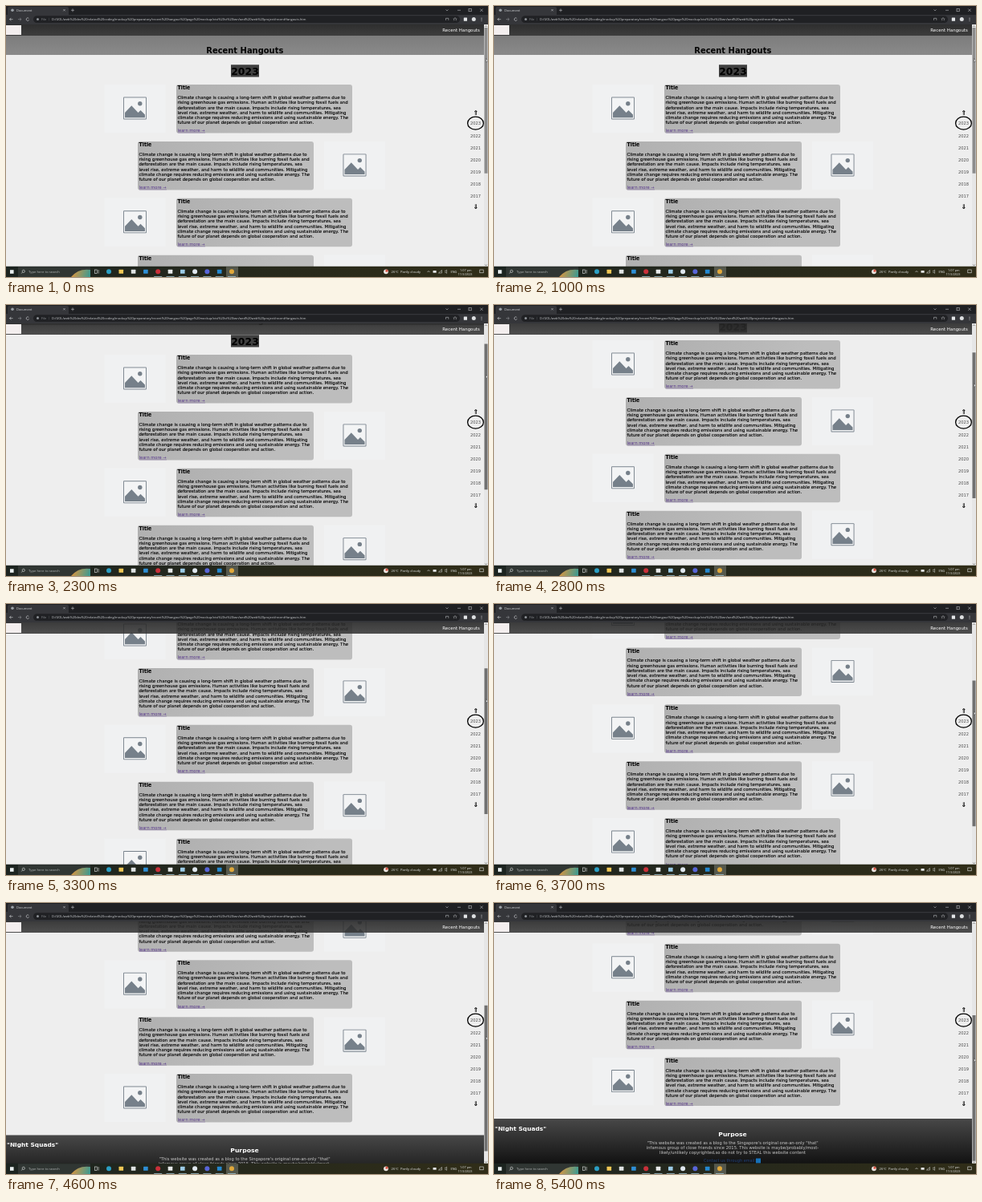
Write an HTML page with a canvas that moves like this. It is 600x338 px and loops after 5.5 s.

```html
<!DOCTYPE html>
<html lang="en">
<head>
<meta charset="utf-8">
<title>Recent Hangouts</title>
<style>
html, body { margin: 0; width: 100%; height: 100%; overflow: hidden; background: #202124; }
canvas { display: block; width: 600px; height: 338px; }
</style>
</head>
<body>
<canvas id="stage"></canvas>
<script>
const W = 600, H = 338, LOOP = 5500, STEP = 100, MAX_SCROLL = 189;
const VERDANA = '"DejaVu Sans", sans-serif';
const SEGOE = '"Open Sans", sans-serif';
const canvas = document.getElementById('stage');
const ctx = canvas.getContext('2d');
const dpr = window.devicePixelRatio || 1;
canvas.width = W * dpr;
canvas.height = H * dpr;

// Scrollbar drag: [time, distance in page pixels]
const DRAG = [[0, 0], [1200, 0], [1800, 18], [2800, 54], [3300, 89], [4100, 140], [5500, 220]];

const BODY = [
  'Climate change is causing a long-term shift in global weather patterns due to',
  'rising greenhouse gas emissions. Human activities like burning fossil fuels and',
  'deforestation are the main cause. Impacts include rising temperatures, sea',
  'level rise, extreme weather, and harm to wildlife and communities. Mitigating',
  'climate change requires reducing emissions and using sustainable energy. The',
  'future of our planet depends on global cooperation and action.'
];
const PURPOSE = [
  '"This website was created as a blog to the Singapore\'s original one-an-only "that"',
  'infamous group of close friends since 2015. This website is maybe/probably/most-',
  'likely/unlikely copyrighted,so do not try to STEAL this website content'
];
const PATH = 'D:/UOL/web%20dev%20related%20coding/mockup%20preparatory/recent%20hangout%20page%20mockup/eist%20st%20iwn/aed%20web%20project/recentHangouts.htm';

function dragAt(t) {
  const i = Math.max(1, DRAG.findIndex(p => p[0] >= t));
  const [t0, a] = DRAG[i - 1], [t1, b] = DRAG[i];
  return a + (b - a) * (t - t0) / (t1 - t0);
}

function rect(x, y, w, h, fill, r = 0) {
  ctx.fillStyle = fill;
  ctx.beginPath();
  ctx.roundRect(x, y, w, h, r);
  ctx.fill();
}

function disc(x, y, r, fill) {
  ctx.fillStyle = fill;
  ctx.beginPath();
  ctx.arc(x, y, r, 0, Math.PI * 2);
  ctx.fill();
}

function line(points, color, width = 0.7) {
  ctx.strokeStyle = color;
  ctx.lineWidth = width;
  ctx.beginPath();
  for (let i = 0; i < points.length; i += 2) ctx.lineTo(points[i], points[i + 1]);
  ctx.stroke();
}

function box(x, y, w, h, color, width = 0.7) {
  ctx.strokeStyle = color;
  ctx.lineWidth = width;
  ctx.strokeRect(x, y, w, h);
}

function gradient(x0, y0, x1, y1, from, to) {
  const g = ctx.createLinearGradient(x0, y0, x1, y1);
  g.addColorStop(0, from);
  g.addColorStop(1, to);
  return g;
}

const fade = (y0, y1, from, to) => gradient(0, y0, 0, y1, from, to);

// Lays text out at ten times its size, so tiny fonts keep exact advances.
function text(str, x, y, size, color, { bold = false, align = 'left', font = VERDANA, outline = 0 } = {}) {
  ctx.save();
  ctx.translate(x, y);
  ctx.scale(0.1, 0.1);
  ctx.font = `${bold ? 'bold ' : ''}${size * 10}px ${font}`;
  ctx.textAlign = align;
  ctx.fillStyle = ctx.strokeStyle = color;
  ctx.lineJoin = 'round';
  ctx.fillText(str, 0, 0);
  if (outline) {
    ctx.lineWidth = outline * 10;
    ctx.strokeText(str, 0, 0);
  }
  ctx.restore();
}

function picture(cx, y) {
  const gray = '#76808a', x = cx - 14.5;
  rect(cx - 38, y, 76, 60, '#f0f1f2');
  rect(x, y + 15.5, 29, 28, gray, 1);
  rect(x + 0.9, y + 16.4, 27.2, 26.2, '#f3f4f5');
  disc(x + 20.8, y + 23.7, 2.7, gray);
  ctx.fillStyle = gray;
  ctx.beginPath();
  for (const [dx, dy] of [[2, 41.2], [2, 35], [10.3, 26.3], [18.5, 35], [21.5, 32], [27, 37.5], [27, 41.2]])
    ctx.lineTo(x + dx, y + dy);
  ctx.fill();
}

function card(i) {
  const y = 98 + 70.9 * i, odd = i % 2;
  const x = odd ? 164 : 212;
  picture(odd ? 434 : 160.5, y);
  rect(x, y, 219, 60.5, gradient(x, y, x + 120, y + 90, '#b0b0b0', '#bdbdbd'), 3);
  text('Title', x + 1.5, y + 6.2, 6.25, '#000', { bold: true });
  BODY.forEach((s, n) => text(s, x + 1.4, y + 18 + 6.25 * n, 5.39, '#000', { outline: 0.12 }));
  text('learn more →', x + 1.6, y + 59.4, 5.15, '#56348c');
  line([x + 1.6, y + 60, x + 36, y + 60], '#56348c', 0.4);
}

function footer() {
  rect(0, 458, 595, 58, fade(458, 514, '#484848', '#121212'));
  text('"Night Squads"', 1, 472.5, 7.45, '#fff', { bold: true });
  text('Purpose', 297, 480, 7.7, '#fff', { bold: true, align: 'center' });
  PURPOSE.forEach((s, n) => text(s, 297, 490 + 6 * n, 5.2, '#c8c8c8', { align: 'center' }));
  text('Contact us through email:', 261, 512, 5, '#1f3f78');
  rect(326, 507.5, 6, 6, '#1671b8');
}

function page(scroll) {
  ctx.save();
  ctx.beginPath();
  ctx.rect(0, 23, 595, 302);
  ctx.clip();
  rect(0, 23, 595, 302, '#eeeeee');
  ctx.translate(0, -scroll);
  rect(0, 23, 595, 38, fade(23, 61, '#747474', '#8a8a8a'));
  text('Recent Hangouts', 297.3, 58.8, 9.93, '#050505', { bold: true, align: 'center' });
  rect(280, 73.3, 35, 15.2, '#404040');
  text('2023', 297.5, 85.6, 12.4, '#000', { bold: true, align: 'center' });
  for (let i = 0; i < 5; i++) card(i);
  footer();
  ctx.restore();
}

function overlay() {
  rect(0, 23, 595, 14, fade(23, 37, 'rgba(38,38,38,.89)', 'rgba(50,50,50,.85)'));
  rect(0, 24, 19, 12, '#f3eeee');
  text('Recent Hangouts', 543.3, 32, 5.43, '#fff');
  text('⇑', 584.8, 136, 8, '#000', { bold: true, align: 'center' });
  for (let i = 0; i < 7; i++)
    text(String(2023 - i), 584.5, (i ? 149 + 15 * i : 148.3), 5.15, '#4c4c4c', { align: 'center' });
  text('⇓', 584.8, 253, 8, '#000', { bold: true, align: 'center' });
  ctx.strokeStyle = '#000';
  ctx.lineWidth = 1.3;
  ctx.beginPath();
  ctx.ellipse(584.5, 146.2, 9.9, 8, 0, 0, Math.PI * 2);
  ctx.stroke();
}

function scrollbar(scroll, drag) {
  rect(595, 23, 5, 302, '#e6e6e6');
  line([596.2, 26, 597.5, 24.6, 598.8, 26], '#666');
  line([596.2, 322.4, 597.5, 323.8, 598.8, 322.4], '#666');
  rect(595.5, 27 + 0.598 * scroll, 4, 181.7, drag > 0 ? '#707070' : '#8c8c8c');
  ctx.save();
  ctx.translate(597.6, 65.5 + 0.598 * drag);
  ctx.fillStyle = '#fff';
  ctx.strokeStyle = '#222';
  ctx.lineWidth = 0.4;
  ctx.beginPath();
  for (const [x, y] of [[0, 0], [0, 4.6], [1.1, 3.6], [2.6, 3.4]]) ctx.lineTo(x, y);
  ctx.closePath();
  ctx.fill();
  ctx.stroke();
  ctx.restore();
}

function browser() {
  const ink = '#d5d7da', dim = '#8f9398';
  rect(0, 0, W, 11, '#1f2023');
  rect(2, 1, 76, 11, '#35363a', [2, 2, 0, 0]);
  rect(0, 11, W, 12, '#35363a');
  disc(8, 5.3, 1.8, '#9aa0a6');
  text('Document', 13, 6.9, 4, ink, { font: SEGOE });
  line([71.3, 4, 73.7, 6.4], ink, 0.5);
  line([73.7, 4, 71.3, 6.4], ink, 0.5);
  line([81, 5.3, 85, 5.3], ink, 0.5);
  line([83, 3.3, 83, 7.3], ink, 0.5);
  line([547.5, 4.4, 549, 6, 550.5, 4.4], ink, 0.5);
  line([562, 5.3, 566, 5.3], ink, 0.5);
  box(576, 3.6, 3.2, 3.2, ink, 0.5);
  line([590.2, 3.5, 593.7, 7], ink, 0.5);
  line([593.7, 3.5, 590.2, 7], ink, 0.5);

  line([8.5, 16.6, 4.5, 16.6], ink, 0.6);
  line([6.3, 14.8, 4.5, 16.6, 6.3, 18.4], ink, 0.6);
  line([15, 16.6, 19, 16.6], dim, 0.6);
  line([17.2, 14.8, 19, 16.6, 17.2, 18.4], dim, 0.6);
  ctx.strokeStyle = ink;
  ctx.beginPath();
  ctx.arc(27, 16.6, 1.8, 0.4, 5.6);
  ctx.stroke();
  rect(34, 12.2, 531, 8.8, '#202124', 4.4);
  disc(39.5, 16.6, 1.5, dim);
  text('File', 44, 18.1, 3.9, dim, { font: SEGOE });
  line([53.5, 14.8, 53.5, 18.4], '#55585c', 0.4);
  text(PATH, 57, 18.1, 3.95, '#d0d3d6', { font: SEGOE });
  line([547.5, 17.8, 547.5, 15.3, 550.8, 15.3, 550.8, 17.8], ink, 0.5);
  line([557.3, 18.4, 558.1, 17, 556.8, 16, 558.3, 15.8, 559, 14.4, 559.7, 15.8, 561.2, 16, 559.9, 17, 560.7, 18.4], ink, 0.4);
  rect(569.8, 14.6, 4.2, 4.2, '#e4e6e8', 0.5);
  disc(582.3, 16.6, 2.5, '#dcdee0');
  for (const y of [14.9, 16.6, 18.3]) disc(592, y, 0.5, ink);
}

function taskbar() {
  const ink = '#e4e6e6', label = { font: SEGOE };
  rect(0, 324.7, W, 13.3, gradient(0, 0, W, 0, '#1c2420', '#302d18'));
  rect(5, 329.2, 4.6, 4.6, '#e8eeee');
  rect(15, 325.2, 90, 12.8, '#303633');
  ctx.strokeStyle = ink;
  ctx.lineWidth = 0.6;
  ctx.beginPath();
  ctx.arc(21.8, 330.8, 1.6, 0, Math.PI * 2);
  ctx.stroke();
  line([20.6, 332, 19.2, 333.6], ink, 0.6);
  text('Type here to search', 28, 333, 4.25, '#b4b8b8', label);
  ctx.fillStyle = gradient(82, 330, 104, 337, '#e0953c', '#3f9a90');
  ctx.beginPath();
  ctx.moveTo(81, 338);
  ctx.quadraticCurveTo(90, 327, 105, 329);
  ctx.lineTo(105, 338);
  ctx.fill();
  box(110.5, 329, 3, 4.6, ink, 0.6);
  line([115.2, 329, 115.2, 333.6], ink, 0.6);

  rect(274, 325.2, 15, 12.8, '#55584c');
  const round = ['#2b9fc4', '#c9303a', '#dfe7ee', '#5865d8', '#e0a83b'];
  const square = ['#f0c755', '#dfe3e3', '#2e8fd6', '#e8eaea', '#9ccbe6', '#2488d0'];
  const apps = [round[0], ...square.slice(0, 3), round[1], ...square.slice(3, 5), round[2], round[3], square[5], round[4]];
  apps.forEach((color, i) => {
    const x = 128 + 15.3 * i;
    if (round.includes(color)) disc(x, 331.3, 3, color);
    else rect(x - 2.8, 328.8, 5.6, 5, color, 0.5);
    if (i > 3) rect(x - 5, 337.2, 10, 0.8, '#9dc0cf');
  });

  disc(473, 331.3, 2.9, '#e9e4e0');
  disc(474, 330.2, 1.6, '#d95746');
  text('26°C', 479.5, 333, 4.2, ink, label);
  text('Partly cloudy', 491, 333, 4.2, ink, label);
  line([524.5, 332, 526, 330.5, 527.5, 332], ink, 0.6);
  rect(531.5, 330, 4.2, 2.8, ink, 0.5);
  line([538.5, 333, 542.5, 329.5, 542.5, 333, 538.5, 333], ink, 0.5);
  line([546, 330.4, 547.2, 330.4, 548.6, 329.2, 548.6, 333.4, 547.2, 332.2, 546, 332.2], ink, 0.5);
  text('ENG', 553.5, 333, 3.9, ink, label);
  text('1:07 pm', 579.5, 330.5, 3.8, ink, { font: SEGOE, align: 'right' });
  text('11/3/2023', 580.5, 336.2, 3.8, ink, { font: SEGOE, align: 'right' });
  box(589.8, 329, 4.4, 3.8, ink, 0.6);
}

function draw(now) {
  const t = Math.floor((now % LOOP) / STEP) * STEP;
  const drag = dragAt(t);
  const scroll = Math.min(drag, MAX_SCROLL);
  ctx.setTransform(dpr, 0, 0, dpr, 0, 0);
  page(scroll);
  overlay();
  scrollbar(scroll, drag);
  browser();
  taskbar();
}

const start = performance.now();
function tick() {
  draw(performance.now() - start);
  requestAnimationFrame(tick);
}
tick();
</script>
</body>
</html>
```
